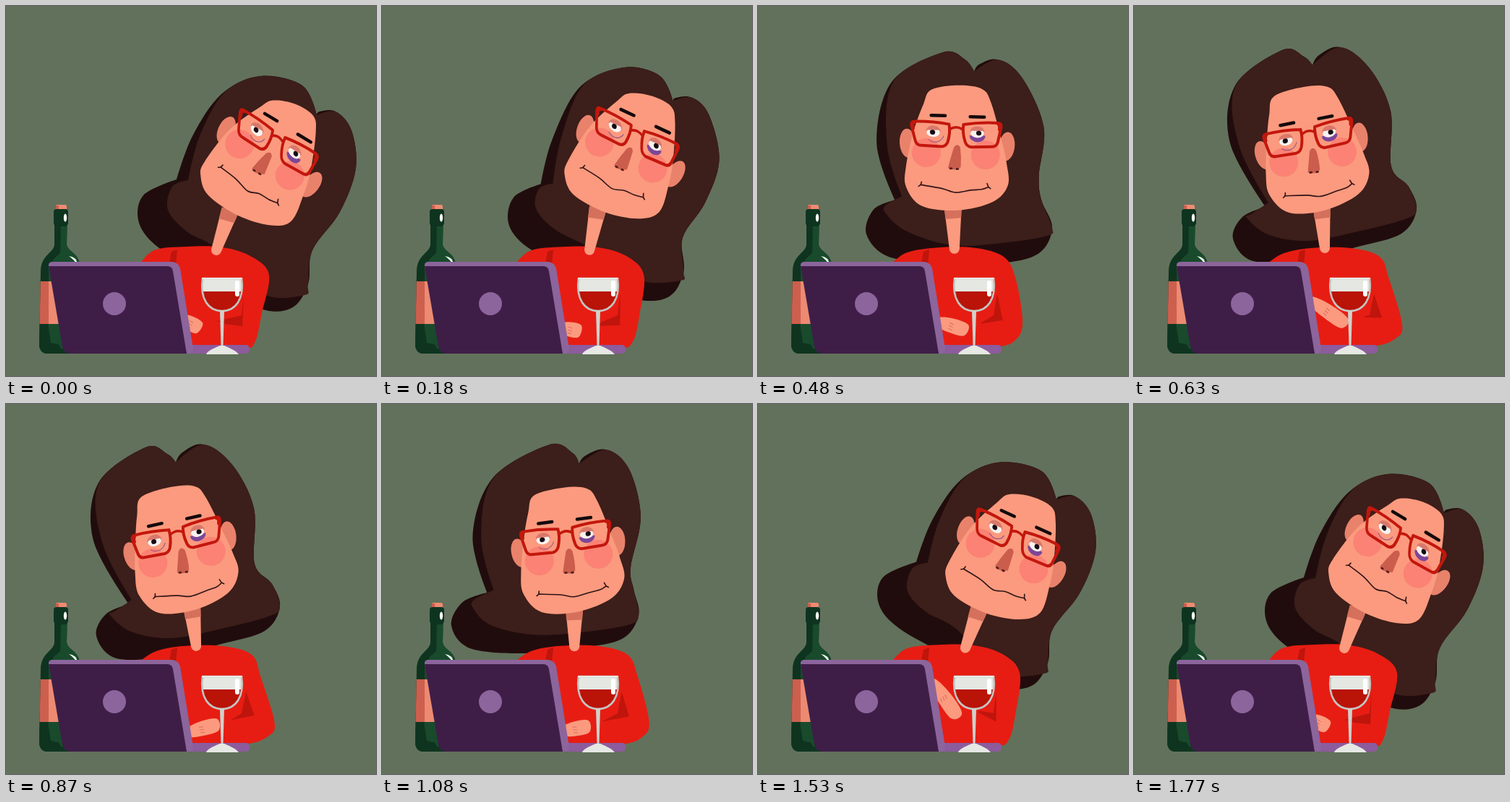
Recreate the animation shown at these times as an HTML page with a canvas. Size 512 px wide and 512 px high, loop 1.8 s.

```html
<!DOCTYPE html>
<html lang="en">
<head>
<meta charset="utf-8">
<title>Late evening</title>
<style>
html, body { margin: 0; width: 100%; height: 100%; overflow: hidden; background: #62715b; }
canvas { display: block; width: 512px; height: 512px; }
</style>
</head>
<body>
<canvas id="stage" width="512" height="512"></canvas>
<script>
const g = document.getElementById('stage').getContext('2d');
const LOOP = 1800, STEP = 30;
const SKIN = '#fb9a7e', EAR = '#e9826b', RED = '#e71d13', DEEP = '#bf150c';
const BROWN = '#3c1e1a', DARK = '#210c0d', LILAC = '#8c659c';

// Hair poses: outer edge (19 points), then the inner edge of the lit part (9 points)
const hairRight = [430,151, 434,146, 456,146, 478,172, 484,225, 462,285, 424,338, 418,385, 395,418, 350,418,
  280,375, 212,335, 184,300, 190,262, 236,240, 258,180, 298,122, 352,97, 410,110,
  413,400, 355,398, 290,335, 250,312, 224,282, 230,250, 252,241, 268,180, 302,120];
const hairLeaving = [350,103, 355,97, 378,95, 405,117, 432,190, 418,250, 402,290, 416,335, 398,372, 350,380,
  270,360, 195,342, 161,310, 168,272, 197,258, 195,190, 228,102, 300,69, 335,79,
  413,345, 350,348, 285,335, 222,308, 193,280, 194,261, 212,254, 210,190, 232,100];
const hairLeft = [247,82, 256,68, 285,57, 325,85, 355,145, 356,222, 380,250, 391,282, 370,315, 310,333,
  240,350, 165,353, 137,322, 150,292, 182,278, 133,190, 140,110, 205,61, 235,70,
  375,295, 310,312, 240,325, 185,316, 156,293, 162,288, 186,272, 146,195, 140,112];
const hairReturning = [347,92, 352,84, 378,80, 405,105, 420,180, 405,240, 389,275, 400,315, 385,347, 335,352,
  265,345, 175,325, 138,293, 146,256, 180,243, 180,180, 215,98, 298,57, 338,72,
  395,328, 340,328, 270,318, 200,298, 174,270, 172,250, 196,243, 191,180, 216,98];

const lerp = (a, b, k) => a + (b - a) * k;
const blend = (a, b, k) => a.map((v, i) => lerp(v, b[i], k));
const shift = (pose, dx, dy, lag = 0, drop = 0) => pose.map((v, i) =>
  i % 2 ? v + dy + drop * v / 400 : v + dx + lag * pose[i + 1] / 300);

const hairKeys = [
  [0, ...hairRight],
  [360, ...hairLeaving],
  [630, ...hairLeft],
  [870, ...shift(hairLeft, -12, -1)],
  [1080, ...shift(blend(hairLeft, hairReturning, .4), -4, -3, -36)],
  [1290, ...hairReturning],
  [1530, ...shift(hairRight, -17, -13, 0, -14)],
  [1770, ...shift(hairRight, -1, 0)]
];

// time, glasses bridge x, y, tilt in degrees
const headKeys = [
  [0, 376, 183, 31], [360, 310, 167, 13.3], [630, 241, 175, -11], [870, 236, 178, -12.4],
  [1080, 254, 178, -7.5], [1290, 310, 173, 9.5], [1530, 359, 179, 24.6], [1770, 376, 183, 31]
];

// time, wrist x, y, fingertips x, y
const handKeys = [
  [0, 264, 443, 244, 434], [360, 278, 454, 252, 458], [630, 288, 436, 246, 408], [870, 288, 444, 252, 455],
  [1290, 274, 447, 248, 448], [1530, 273, 427, 243, 386], [1770, 264, 444, 244, 436]
];

const faceRight = [-43,-25, -32,-42, -4,-53, 26,-52, 41,-34, 61,12, 71,49, 75,89, 52,109, 7,120, -42,117, -65,99, -70,79, -63,23];
const faceLeft = [-48,-35, -37,-58, 6,-63, 38,-57, 50,-38, 64,17, 70,44, 72,72, 52,97, 3,110, -47,104, -69,75, -68,43, -58,-1];
const mouthRight = [-47,75, -21,78, 2,84, 17,79, 33,79, 46,77];
const mouthLeft = [-48,80, -18,85, 0,90, 23,87, 38,85, 46,81];
const bodyRight = [183,360, 205,338, 250,333, 300,334, 340,347, 364,372, 354,425, 344,466, 325,474, 230,474];
const bodyLeft = [181,360, 205,343, 245,335, 300,335, 340,347, 353,378, 371,440, 362,460, 328,471, 230,474];

// Smooth looping interpolation without overshoot
function track(keys, t) {
  const n = keys.length;
  const at = j => keys[(j + n) % n];
  const time = j => at(j)[0] + Math.floor(j / n) * LOOP;
  let i = n - 1;
  while (keys[i][0] > t) i--;
  const h = time(i + 1) - time(i), u = (t - time(i)) / h;
  const slope = (j, c) => (at(j + 1)[c] - at(j)[c]) / (time(j + 1) - time(j));
  const tangent = (j, c) => {
    const a = slope(j - 1, c), b = slope(j, c);
    return a * b > 0 ? 2 * a * b / (a + b) : 0;
  };
  const out = [];
  for (let c = 1; c < keys[0].length; c++) {
    const p = at(i)[c], q = at(i + 1)[c], m = tangent(i, c) * h, w = tangent(i + 1, c) * h;
    out.push(p + u * (m + u * (3 * (q - p) - 2 * m - w + u * (2 * (p - q) + m + w))));
  }
  return out;
}

const pairs = a => Array.from({ length: a.length / 2 }, (_, i) => [a[2 * i], a[2 * i + 1]]);

function fill(color) { g.fillStyle = color; g.fill(); }
function stroke(color, width) { g.strokeStyle = color; g.lineWidth = width; g.stroke(); }

function curve(p, closed = true, corners = []) {
  const n = p.length;
  const at = i => closed ? p[(i + n) % n] : p[Math.max(0, Math.min(n - 1, i))];
  const tan = (i, c) => corners.includes((i + n) % n) ? 0 : (at(i + 1)[c] - at(i - 1)[c]) / 6;
  g.beginPath();
  g.moveTo(...p[0]);
  for (let i = 0; i < (closed ? n : n - 1); i++) {
    const a = at(i), b = at(i + 1);
    g.bezierCurveTo(a[0] + tan(i, 0), a[1] + tan(i, 1), b[0] - tan(i + 1, 0), b[1] - tan(i + 1, 1), b[0], b[1]);
  }
  if (closed) g.closePath();
}

function poly(color, ...a) {
  g.beginPath();
  pairs(a).forEach(p => g.lineTo(...p));
  g.closePath();
  fill(color);
}

function oval(color, x, y, rx, ry = rx, turn = 0, from = 0, to = 7) {
  g.beginPath();
  g.ellipse(x, y, rx, ry, turn, from, Math.min(to, from + Math.PI * 2));
  fill(color);
}

function line(color, width, ...a) {
  g.beginPath();
  pairs(a).forEach(p => g.lineTo(...p));
  stroke(color, width);
}

function rounded(color, x, y, w, h, r) {
  g.beginPath();
  g.roundRect(x, y, w, h, r);
  fill(color);
}

function drawHair(t) {
  const p = pairs(track(hairKeys, t)), edge = p.slice(0, 19), inner = p.slice(19);
  curve(edge, true, [0, 14]);
  fill(DARK);
  curve([edge[0], ...edge.slice(2, 8), ...inner, ...edge.slice(17)], true, [0, 13]);
  fill(BROWN);
}

function drawBody(k, t) {
  curve(pairs(blend(bodyLeft, bodyRight, k)), true, [0, 9]);
  fill(RED);
  poly(DEEP, 229, 340, 237, 337, 235, 358, 226, 356);
  const [wx, wy, tx, ty] = track(handKeys, t);
  const ex = lerp(344, 328, k), ey = lerp(444, 456, k);
  poly(DEEP, lerp(332, 329, k), 398, lerp(344, 327, k), ey - 10, wx + 22, wy + 5, wx + 20, wy - 5, 326, 428);
  line(RED, 25, ex, ey, wx + 18, wy + 7);
  poly(RED, wx + 6, wy - 10, wx + 32, wy - 6, wx + 32, wy + 18, wx + 2, wy + 11);
  const a = Math.atan2(wy - ty, wx - tx), len = Math.hypot(wx - tx, wy - ty);
  g.save();
  g.translate(tx, ty);
  g.rotate(a);
  curve([[-3, -5], [len * .5, -10], [len + 6, -7], [len + 4, 9], [len * .5, 10], [0, 6]]);
  fill(SKIN);
  for (const y of [-3, 1, 5]) line('#d66f5b', 1, len * .45, y, len * .45 + 5, y + 1);
  g.restore();
}

function drawNeck(x, y, tilt, k) {
  const c = Math.cos(tilt), s = Math.sin(tilt);
  const lx = -3 + 2 * k, ly = 113 + 13 * k;
  const top = [x + lx * c - ly * s, y + lx * s + ly * c - 8];
  const end = [lerp(264, 291, k), lerp(335, 338, k)];
  const a = Math.atan2(end[1] - top[1], end[0] - top[0]) - Math.PI / 2;
  const len = Math.hypot(end[0] - top[0], end[1] - top[1]);
  g.save();
  g.translate(...top);
  g.rotate(a);
  poly(SKIN, -12, 0, 12, 0, 7, len, -7, len);
  oval(SKIN, 0, len, 7);
  poly('#d4705c', -12, 0, 12, 0, 11, 15, -11, 16);
  g.restore();
}

function drawEye(x, y, bag) {
  oval('#d9786a', x, y - 1, 10, 8, 0, Math.PI);
  oval('#7c4698', x, y + 4, 11, bag ? 9 : 0, 0, 0, Math.PI);
  oval('#f7f3f0', x, y, 9.5, 7, 0, 0, Math.PI);
  poly('#f7f3f0', x - 9.5, y + .5, x - 8, y - 2.5, x + 8, y - 2.5, x + 9.5, y + .5);
  oval('#160b12', x + (bag ? 2 : -1), y + .5, 3.6, 3.3);
  if (!bag) {
    g.beginPath();
    g.arc(x + 2, y + 1, 13, .35, 2.3);
    stroke('#8a4f86', 1);
  }
}

function drawHead(x, y, tilt, k) {
  g.save();
  g.translate(x, y);
  g.rotate(tilt);
  oval(EAR, -67, 19 + 8 * k, 11, 20, -.1);
  oval(EAR, 69 + 4 * k, 20 + 11 * k, 11, 20, .1);
  curve(pairs(blend(faceLeft, faceRight, k)));
  fill(SKIN);
  oval('#fb8274', -41, 34, 20);
  oval('#fb8274', 41, 35.5, 20);

  // nose
  g.beginPath();
  g.moveTo(-3, 26);
  g.quadraticCurveTo(2, 19, 6, 26);
  g.quadraticCurveTo(8, 40, 6 + 4 * k, 54 - 2 * k);
  g.quadraticCurveTo(-2, 60, -11 + 2 * k, 54);
  g.quadraticCurveTo(-7, 40, -3, 26);
  fill('#cb5d4d');
  oval('#54201d', -7 + 2 * k, 55, 2.5, 1.5);
  oval('#54201d', 2 + 2 * k, 56 - k, 2.5, 1.5);

  const m = blend(mouthLeft, mouthRight, k);
  curve(pairs(m), false);
  stroke('#301316', 1.6);
  line('#301316', 1.6, m[0] - 3, m[1] + 2, m[0], m[1], m[0] + 1, m[1] - 4);
  line('#301316', 1.6, m[10] - 2, m[11] - 5, m[10], m[11], m[10] + 3, m[11] + 2);

  const by = -17 - 3 * k;
  line('#140a0c', 4.5, -36 + 3 * k, by, -17 + 4 * k, by);
  line('#140a0c', 4.5, 18 + 3 * k, by + 1, 37 + 5 * k, by + 1);

  g.transform(1, 0, -.06 + .32 * k, 1, 0, 0);
  drawEye(-32, 5, false);
  drawEye(29, 5, true);
  for (const side of [-1, 1]) {
    const q = side * 1;
    g.beginPath();
    g.moveTo(q * 10, -6);
    g.quadraticCurveTo(q * 34, -10, q * 58, -9);
    g.quadraticCurveTo(q * 63, -9, q * 62, -3);
    g.lineTo(q * 57, 18);
    g.quadraticCurveTo(q * 55, 24, q * 49, 24);
    g.lineTo(q * 20, 25);
    g.quadraticCurveTo(q * 14, 24, q * 12, 18);
    g.quadraticCurveTo(q * 8, 5, q * 10, -6);
    stroke('#c3170d', 4);
    line('#c3170d', 5, q * 58, -8, q * 61, -6, q * 60, 0);
  }
  g.beginPath();
  g.moveTo(-9, 1);
  g.quadraticCurveTo(0, -5, 9, 1);
  stroke('#c3170d', 3.5);
  g.restore();
}

function drawBottle() {
  g.beginPath();
  g.moveTo(67, 283);
  g.lineTo(85, 283);
  g.lineTo(84, 330);
  g.bezierCurveTo(86, 342, 103, 340, 103, 366);
  g.lineTo(103, 481);
  g.lineTo(56, 481);
  g.quadraticCurveTo(47, 480, 46, 470);
  g.lineTo(48, 366);
  g.bezierCurveTo(49, 344, 66, 342, 67, 330);
  g.closePath();
  fill('#0e3420');
  g.save();
  g.clip();
  poly('#194a2c', 76, 305, 90, 305, 110, 350, 110, 482, 60, 470, 59, 366, 66, 350, 75, 342);
  poly('#0e3420', 59, 440, 80, 482, 46, 482, 46, 440);
  poly('#194a2c', 58, 440, 75, 440, 80, 470, 62, 466);
  poly('#cc5f4e', 46, 381, 60, 381, 60, 440, 46, 440);
  poly('#ec8a72', 59, 381, 100, 381, 100, 440, 59, 440);
  g.restore();
  rounded('#ec8a72', 69, 275, 15, 8, 2);
  poly('#cc5f4e', 69, 276, 73, 276, 73, 282, 69, 282);
  rounded('#0e3420', 66, 281, 20, 23, 4);
  oval('#f4f7f2', 82, 293, 2.2, 5.5);
  g.beginPath();
  g.moveTo(87, 346);
  g.quadraticCurveTo(98, 347, 99, 358);
  g.quadraticCurveTo(93, 350, 87, 346);
  fill('#f4f7f2');
}

function drawLaptop() {
  rounded('#8c5c9c', 244, 469, 93, 12, [0, 5, 5, 0]);
  g.beginPath();
  g.moveTo(63, 354);
  g.lineTo(230, 354);
  g.quadraticCurveTo(239, 355, 241, 363);
  g.lineTo(259, 474);
  g.quadraticCurveTo(259, 481, 252, 481);
  g.lineTo(90, 481);
  g.lineTo(59, 361);
  g.quadraticCurveTo(58, 355, 63, 354);
  fill(LILAC);
  g.beginPath();
  g.moveTo(59, 360);
  g.lineTo(223, 360);
  g.quadraticCurveTo(230, 360, 231, 367);
  g.lineTo(250, 481);
  g.lineTo(88, 481);
  g.quadraticCurveTo(80, 480, 78, 471);
  g.closePath();
  fill('#3e1e47');
  oval(LILAC, 150, 412, 16);
}

function bowl() {
  g.beginPath();
  g.moveTo(272, 377);
  g.bezierCurveTo(268, 405, 280, 422, 299, 422);
  g.bezierCurveTo(318, 422, 330, 405, 326, 377);
  g.closePath();
}

function drawGlass() {
  g.save();
  bowl();
  g.clip();
  g.fillStyle = '#e4e7e2';
  g.fillRect(268, 376, 62, 19);
  g.fillStyle = '#ba1308';
  g.fillRect(268, 395, 62, 30);
  rounded('#ffffff', 317, 380, 6, 22, 3);
  g.restore();
  bowl();
  stroke('#c3c5c0', 2.6);
  line('#e9ebe7', 2, 272, 377, 326, 377);
  poly('#cfd1cc', 296, 421, 302, 421, 300.5, 470, 297.5, 470);
  g.beginPath();
  g.moveTo(277, 482);
  g.quadraticCurveTo(278, 477, 296, 470);
  g.lineTo(302, 470);
  g.quadraticCurveTo(319, 477, 322, 482);
  g.closePath();
  fill('#e6e8e4');
}

function draw(t) {
  const [x, y, deg] = track(headKeys, t);
  const tilt = deg * Math.PI / 180, k = (deg + 11) / 42;
  g.fillStyle = '#62715b';
  g.fillRect(0, 0, 512, 512);
  g.lineCap = g.lineJoin = 'round';
  drawHair(t);
  drawBody(k, t);
  drawNeck(x, y, tilt, k);
  drawHead(x, y, tilt, k);
  drawBottle();
  drawLaptop();
  drawGlass();
}

function tick() {
  draw(Math.floor(performance.now() % LOOP / STEP) * STEP);
  requestAnimationFrame(tick);
}
tick();
</script>
</body>
</html>
```
